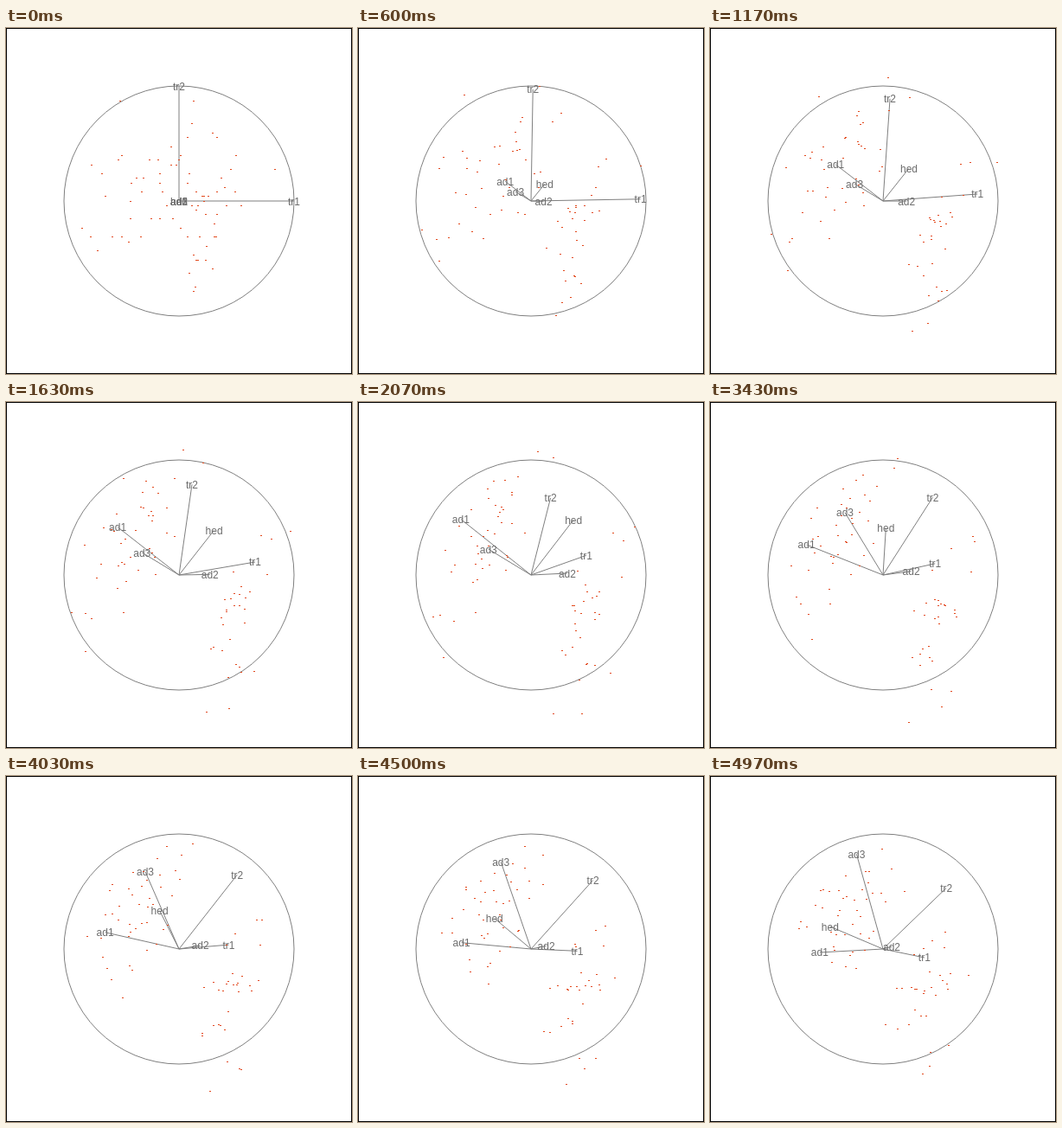
An HTML page for the animation above (5000 ms loop, 400 by 400 pixels).

```html
<!DOCTYPE html>
<html lang="en">
<head>
<meta charset="utf-8">
<title>Rotating projection of six variables</title>
<style>
  html, body { margin: 0; width: 100%; height: 100%; overflow: hidden; background: #fff; }
  svg { display: block; width: 100vw; height: 100vh; }
  text { font: 12px "Liberation Sans", Arial, sans-serif; text-anchor: middle; fill: #6c6c6c; }
</style>
</head>
<body>
<svg viewBox="0 0 400 400">
  <rect x=".5" y=".5" width="399" height="399" fill="#fff" stroke="#000"/>
  <g fill="none" stroke="#7f7f7f">
    <circle cx="200" cy="200" r="133"/>
    <path id="spokes"/>
  </g>
  <g id="labels"></g>
  <path id="dots" fill="#e2481a" shape-rendering="crispEdges"/>
</svg>
<script>
const CENTER = 200, RADIUS = 133, SPREAD = 204.5;
const LOOP_MS = 5000, KEY_STEP = 62, TURN_STEP = 66, LAST_STEP = 149;
const NAMES = ["tr1", "tr2", "hed", "ad1", "ad2", "ad3"];

// Measurements fall into three clusters sharing one spread per variable.
const MEANS = [177.3, 124, 50.35, 134.8, 13, 95.4];
const RANGES = [120, 39, 15, 41, 8, 68];
const DEVIATIONS = [12, 7, 2.2, 4.6, 1, 6.5];
const SIZE_SHARE = .6;
const CLUSTERS = [
  { count: 21, center: [183, 130, 51.2, 146.2, 14.1, 104.9] },
  { count: 20, center: [139, 125, 51.6, 138.3, 10.1, 106.6] },
  { count: 28, center: [201, 119, 48.8, 124.6, 14.3, 81] }
];
const EXTREMES = [
  [122, 113, 45, 131, 10, 102],
  [137, 146, 53, 137, 10, 113],
  [242, 131, 54, 131, 16, 90],
  [184, 108, 43, 116, 16, 75],
  [187, 112, 49, 119, 14, 55]
];

// Projection planes as [x axis, y axis], one entry per variable.
const START = [[1, 0, 0, 0, 0, 0], [0, 1, 0, 0, 0, 0]];
const NEAR_TURN = [[.48, .17, .37, -.61, .315, -.37], [.17, .67, .48, .485, .015, .225]];
const END = [[.36, .55, -.46, -.55, .075, -.23], [-.075, .53, .195, -.03, .02, .825]];

function seeded(seed) {
  return () => (seed = (seed * 16807) % 2147483647) / 2147483647;
}

function makePoints() {
  const random = seeded(90417);
  const bell = () => 2 * (random() + random() + random()) - 3;
  const specimen = center => {
    const size = SIZE_SHARE * bell(), own = Math.sqrt(1 - SIZE_SHARE ** 2);
    return center.map((mean, i) => Math.round(mean + DEVIATIONS[i] * (size + own * bell())));
  };
  const clustered = CLUSTERS.flatMap(({ count, center }) =>
    Array.from({ length: count }, () => specimen(center)));
  return [...clustered, ...EXTREMES].map(values =>
    values.map((value, i) => (value - MEANS[i]) / RANGES[i]));
}

const dot = (a, b) => a.reduce((sum, v, i) => sum + v * b[i], 0);
const mix = (a, p, b, q) => a.map((v, i) => p * v + q * b[i]);

function rotate([x, y], angle) {
  const c = Math.cos(angle), s = Math.sin(angle);
  return [mix(x, c, y, s), mix(x, -s, y, c)];
}

function slerp(a, b, s) {
  const angle = Math.acos(dot(a, b)), k = Math.sin(angle);
  return mix(a, Math.sin((1 - s) * angle) / k, b, Math.sin(s * angle) / k);
}

// Geodesic between two planes: turn to principal directions, slerp, turn back.
function geodesic(from, to, s) {
  const cross = dot(from[0], to[1]) + dot(from[1], to[0]);
  const angle = Math.atan2(cross, dot(from[0], to[0]) - dot(from[1], to[1])) / 2;
  const a = rotate(from, angle), b = rotate(to, angle);
  return rotate([slerp(a[0], b[0], s), slerp(a[1], b[1], s)], -angle);
}

const firstLeg = step => geodesic(START, NEAR_TURN, step / KEY_STEP);
const TURN = firstLeg(TURN_STEP);
const planeAt = step => step <= TURN_STEP
  ? firstLeg(step)
  : geodesic(TURN, END, (step - TURN_STEP) / (LAST_STEP - TURN_STEP));

const find = id => document.getElementById(id);
const points = makePoints();
const labels = NAMES.map(name => {
  const label = document.createElementNS("http://www.w3.org/2000/svg", "text");
  label.textContent = name;
  return find("labels").appendChild(label);
});

function draw(step) {
  const [xAxis, yAxis] = planeAt(step);
  let spokes = "";
  labels.forEach((label, i) => {
    const x = CENTER + RADIUS * xAxis[i], y = CENTER - RADIUS * yAxis[i];
    spokes += `M${CENTER} ${CENTER}L${x} ${y}`;
    label.setAttribute("x", x);
    label.setAttribute("y", y + 4.5);
  });
  find("spokes").setAttribute("d", spokes);
  find("dots").setAttribute("d", points.map(p => {
    const x = Math.round(CENTER + SPREAD * dot(p, xAxis) - .5);
    const y = Math.round(CENTER - SPREAD * dot(p, yAxis) - .5);
    return `M${x} ${y}h2v1h-2z`;
  }).join(""));
}

// 150 steps per loop, each starting on a whole hundredth of a second.
const stepAt = ms => Math.floor((Math.floor(ms / 10) * 10 + 5) * .03);

const began = performance.now();
function tick() {
  draw(stepAt((performance.now() - began) % LOOP_MS));
  requestAnimationFrame(tick);
}
tick();
</script>
</body>
</html>
```
